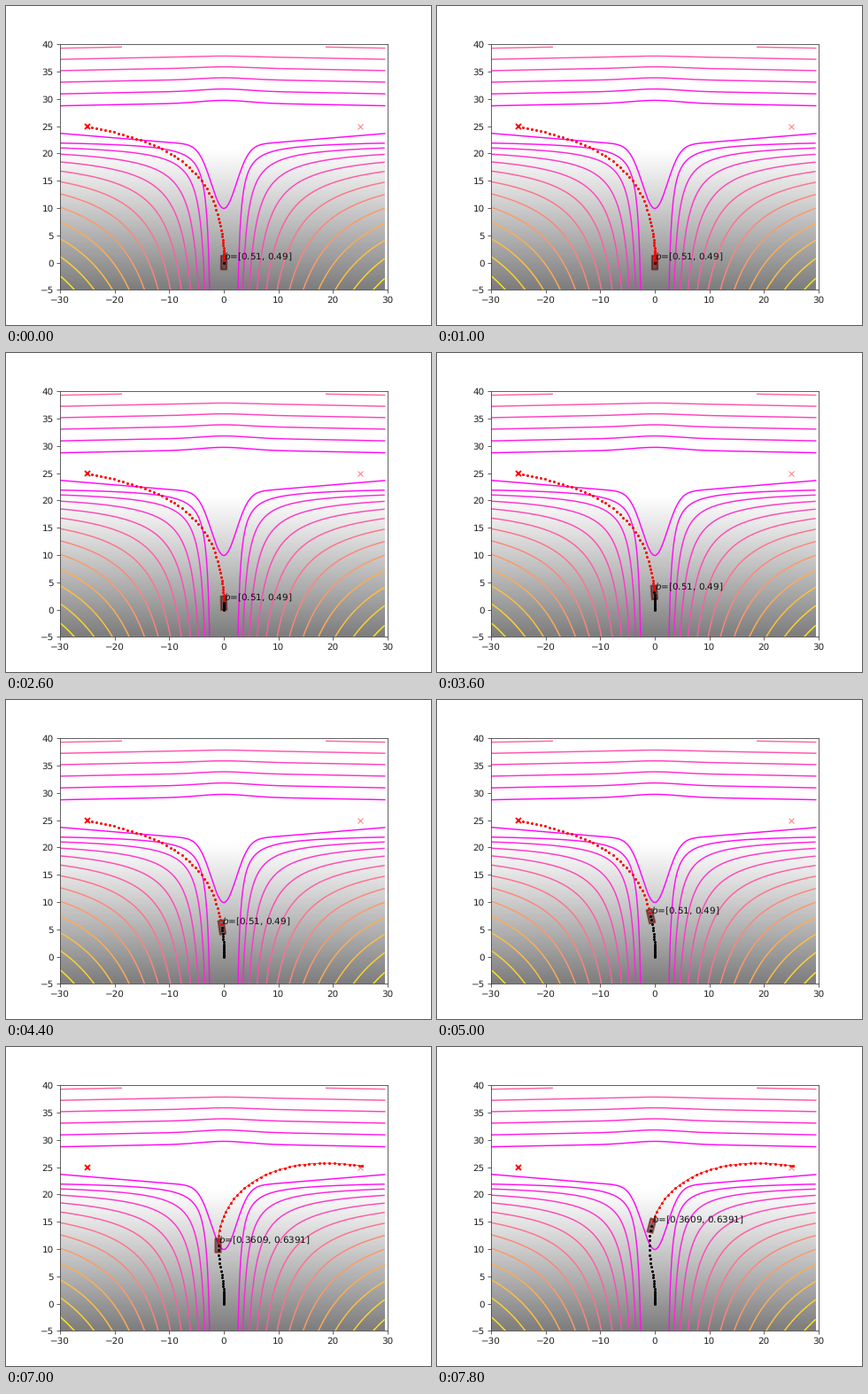
A matplotlib script for the animation above (8 s loop, 480x360 px).

```python
import numpy as np
import matplotlib.pyplot as plt
from matplotlib.animation import FuncAnimation
from matplotlib.patches import Polygon

FRAMES, STEP_MS = 40, 200
REPLAN = 20      # step at which the second plan takes over
HORIZON = 63
ACCEL = 0.0186   # distance covered is ACCEL * k**2 until cruising
CRUISE_LEFT, CRUISE_RIGHT = 0.85, 0.92
LEVELS = 12
POWER = 0.4
LINE = 1.4

plt.rcParams["text.hinting"] = "none"


def bezier(*points):
    p0, p1, p2, p3 = np.array(points, float)
    t = np.linspace(0, 1, 400)[:, None]
    return ((1 - t)**3 * p0 + 3 * t * (1 - t)**2 * p1
            + 3 * t**2 * (1 - t) * p2 + t**3 * p3)


def travelled(k, cruise):
    """Distance after k steps: speed up, then hold the cruise speed."""
    kc = cruise / (2 * ACCEL)
    return np.where(k < kc, ACCEL * k**2,
                    ACCEL * kc**2 + cruise * (k - kc))


def along(curve, dist):
    """Points of the curve at the given arc lengths."""
    seg = np.hypot(*np.diff(curve, axis=0).T)
    s = np.concatenate([[0], np.cumsum(seg)])
    return np.column_stack([np.interp(dist, s, c) for c in curve.T])


def state(i):
    """Step along the plan and whether the second plan is active."""
    if i <= 25:
        return max(0, i - 5), False
    return REPLAN + max(0, i - 31), True


steps = np.arange(HORIZON + 1.0)
left_plan = along(bezier((0, 0), (0.1, 19.3), (-13, 22.4), (-25, 25)),
                  travelled(steps, CRUISE_LEFT))

late = travelled(steps, CRUISE_RIGHT)
right_plan = left_plan.copy()
right_plan[REPLAN:] = along(
    bezier(left_plan[REPLAN], (-3, 19.4), (7.3, 28), (25.3, 25.2)),
    late[REPLAN:] - late[REPLAN])

fig = plt.figure(figsize=(6.4, 4.8), dpi=75, facecolor="white")
ax = fig.add_subplot()
ax.set_aspect("equal")

# Grey shading, darker towards the bottom
rows = np.linspace(-5, 40, 181)
shade = 1 - 0.51 * np.clip((21 - rows) / 26, 0, 1)**1.08
ax.imshow(np.repeat(shade[:, None], 2, axis=1), cmap="gray", vmin=0, vmax=1,
          extent=(-30, 29.5, -5, 40), origin="lower",
          interpolation="bilinear", zorder=0)

# Cost contours: two lower corners, the dip and the upper lines
spring = plt.get_cmap("spring")


def corner_cost(dx, dy):
    return (dx**-POWER + dy**-POWER)**(-1 / POWER)


n = np.arange(LEVELS)
depths = 1.8 + 0.75 * n + 0.133 * n**2
for ends in ((-30, -1), (1, 29.5)):
    X, Y = np.meshgrid(np.linspace(*ends, 160), np.linspace(-5, 23.6, 160))
    ax.contour(X, Y, corner_cost(np.abs(X) - 0.8, 23.7 - Y),
               levels=corner_cost(29.2, depths),
               colors=spring(np.linspace(0.07, 0.9, LEVELS)),
               linewidths=LINE, zorder=1)

x = np.linspace(-30, 29.5, 240)
dip = 9.9 + 11.3 * (1 - np.exp(-(x / 3.27)**2)) + 0.083 * np.abs(x)
ax.plot(x, dip, color=spring(0.03), lw=LINE, zorder=1)

for i in range(6):
    y = (28.73 + 2.2 * i - 0.018 * i**2
         + 0.6 * (1 - np.sqrt(x**2 + 25) / 30.4)
         + (0.5 - 0.1 * i) * np.exp(-(x / 6)**2))
    ax.plot(x, np.where(y <= 39.5, y, np.nan),
            color=spring(0.04 + 0.072 * i), lw=LINE, zorder=1)

# Goals
ax.plot(-25, 25, "x", color="red", ms=6, mew=1.8, zorder=3)
ax.plot(25, 25, "x", color="red", ms=6, mew=1.0, alpha=0.5, zorder=3)

# Moving parts
dots = dict(marker="o", ms=2.9, mew=0)
plan_line, = ax.plot([], [], color="red", lw=0.6, zorder=3)
plan_dots, = ax.plot([], [], color="red", ls="", zorder=4, **dots)
trail, = ax.plot([], [], color="black", ls="", zorder=5, **dots)
car = Polygon(np.zeros((4, 2)), closed=True, facecolor=(0.25, 0.06, 0.06, 0.5),
              edgecolor=(0.4, 0.04, 0.04, 0.6), lw=2, joinstyle="round",
              zorder=3.5)
ax.add_patch(car)
label = ax.text(0, 0, "", fontsize=10, color="#111111", zorder=6)

ax.set_xlim(-30, 30)
ax.set_ylim(-5, 40)
ax.set_xticks(range(-30, 31, 10))
ax.set_yticks(range(-5, 41, 5))
ax.tick_params(color="#444444", labelcolor="#222222")
ax.spines[:].set_color("#444444")

BOX = np.array([(1, 1), (1, -1), (-1, -1), (-1, 1)]) * (1.25, 0.5)


def update(i):
    k, second = state(i)
    plan = right_plan if second else left_plan
    pos = plan[k]
    ahead = plan[k + 1] - plan[max(k - 1, 0)]
    c, s = ahead / np.hypot(*ahead)
    car.set_xy(BOX @ np.array([(c, s), (-s, c)]) + pos)
    plan_dots.set_data(*plan[k:].T)
    plan_line.set_data(*plan[k:].T)
    plan_line.set_visible(second)
    trail.set_data(*plan[:k + 1].T)
    label.set_position(pos + (0.05, 0.6))
    label.set_text("$b$=[0.3609, 0.6391]" if second else "$b$=[0.51, 0.49]")
    return plan_line, plan_dots, trail, car, label


anim = FuncAnimation(fig, update, frames=FRAMES, interval=STEP_MS,
                     init_func=lambda: update(0), repeat=True, repeat_delay=0)
plt.show()
```
